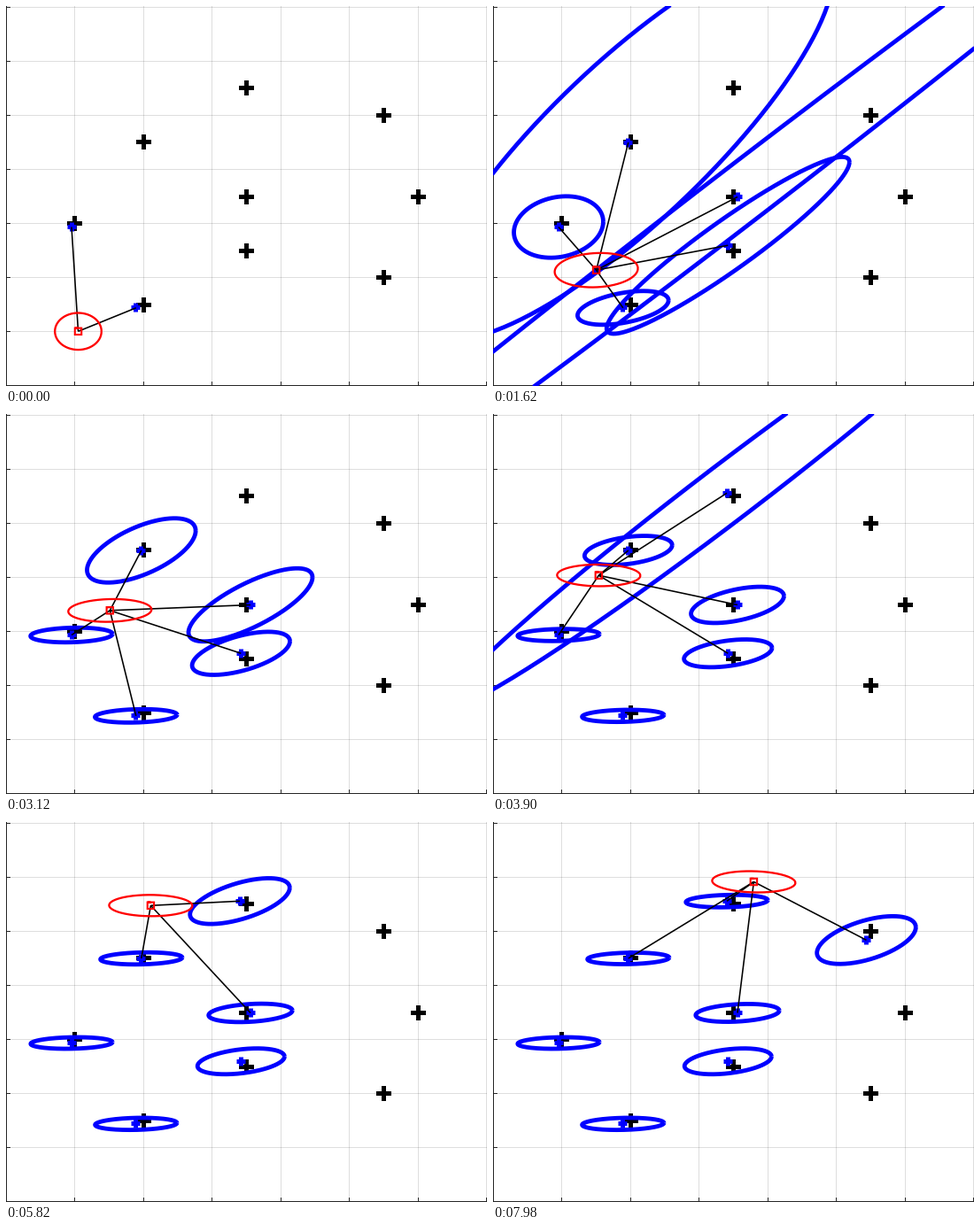
A matplotlib script that plays this animation: 543 by 429 pixels, repeating every 8 s.

```python
import numpy as np
import matplotlib.pyplot as plt
from matplotlib.animation import FuncAnimation

W, H, DPI = 543, 429, 100
UX, UY = 542 / 7, 61.13       # pixels per map unit
SIGHT = 2.5                   # sensor range in map units
SPEED = 0.05                  # map units per step
TICK, STEP, LOOP = 20, 60, 8000   # ms
STEPS = LOOP // STEP + 1
BLUE, RED, AXIS = "#0000ff", "#ff0000", "#262626"

fig = plt.figure(figsize=(W / DPI, H / DPI), dpi=DPI, facecolor="white")
ax = fig.add_axes([0, 0, 1, 1])
ax.set_xlim(0, W)
ax.set_ylim(H, 0)
ax.axis("off")


def stroke(x, y, color, px, z, alpha=1):
    line, = ax.plot(x, y, color=color, lw=px * 72 / DPI, zorder=z, alpha=alpha,
                    solid_capstyle="butt", solid_joinstyle="miter", snap=False)
    return line


def cross(x, y, arm, color, z):
    x, y, gap = int(x) + 0.5, int(y) + 0.5, np.nan
    return stroke([x - arm, x + arm, gap, x, x],
                  [y, y, gap, y - arm, y + arm], color, 5, z)


def to_px(ux, uy):
    return int(0.5 + UX * ux) + 0.5, int(428.98 - UY * uy) + 0.5


# Grid and axes
for k in range(8):
    gx, gy = to_px(k, k)
    stroke([gx, gx], [0, H], AXIS, 1, 0, 0.15)
    stroke([0, W], [gy, gy], AXIS, 1, 0, 0.15)
    stroke([gx, gx], [H - 5, H], AXIS, 1, 1)
    stroke([0, 5], [gy, gy], AXIS, 1, 1)
stroke([0.5, 0.5], [0, H], AXIS, 1, 1)
stroke([0, W], [428.5, 428.5], AXIS, 1, 1)

for spot in [(1, 3), (2, 1.5), (3.5, 5.5), (3.5, 3.5), (3.5, 2.5),
             (5.5, 5), (5.5, 2), (6, 3.5), (2, 4.5)]:
    cross(*to_px(*spot), 8.5, "black", 2)

# Robot path: step, x, y, heading in degrees
WAY = np.array([(0, 81.5, 367.3, 5), (11, 112.3, 347.4, 74), (27, 116.6, 298.2, 89),
                (76, 123.7, 148.8, 82), (97, 163.4, 94.3, 39), (133, 294.4, 67.5, -8)])


def robot(step):
    """Cubic curve through the key points, driven at constant speed."""
    i = min(np.searchsorted(WAY[:, 0], step, side="right") - 1, len(WAY) - 2)
    a, b = WAY[i], WAY[i + 1]
    span = b[0] - a[0]
    t = (step - a[0]) / span

    def slope(key):
        h = np.radians(key[3])
        return SPEED * span * np.array([UX * np.cos(h), -UY * np.sin(h)])

    return ((2 * t**3 - 3 * t**2 + 1) * a[1:3] + (t**3 - 2 * t**2 + t) * slope(a)
            + (3 * t**2 - 2 * t**3) * b[1:3] + (t**3 - t**2) * slope(b))


PATH = np.array([robot(s) for s in range(STEPS)])
ANGLE = np.linspace(0, 2 * np.pi, 241)
CIRCLE = np.array([np.cos(ANGLE), np.sin(ANGLE)])
DIAGONAL = np.array([1, -0.77])


def ellipse(center, cov):
    return np.linalg.cholesky(cov) @ CIRCLE + np.reshape(center, (2, 1))


def fade(n, tau):
    return np.exp(-n / tau)


class Feature:
    """A mapped point whose uncertainty shrinks with every sighting.

    depth and boost stretch it along the diagonal (slow and fast decay),
    ray along the first line of sight; rest is the stretch that remains.
    """

    def __init__(self, x, y, depth, boost=0, ray=0, rest=7.5):
        self.pos = np.array([x, y])
        self.depth, self.boost, self.ray, self.rest = depth, boost, ray, rest
        gap = self.pos - PATH
        self.seen = np.hypot(*(gap / (UX, UY)).T) < SIGHT
        self.count = np.maximum(np.cumsum(self.seen) - 1, 0)
        self.first = np.argmax(self.seen)
        self.aim = gap[self.first] / np.hypot(*gap[self.first])
        self.mark = cross(x, y, 5, BLUE, 3)
        self.ring = stroke([], [], BLUE, 4.8, 4)
        self.beam = stroke([], [], "black", 1.6, 5)

    def cov(self, step):
        n = self.count[step]
        along = self.depth * fade(n, 16) + self.boost * fade(n, 3)
        sight = self.ray * fade(n, 12)
        return (np.diag([45.5, 3 + 20 * fade(n, 12)]) ** 2
                + (along**2 + self.rest**2) * np.outer(DIAGONAL, DIAGONAL)
                + sight**2 * np.outer(self.aim, self.aim))

    def update(self, step):
        known = bool(step >= self.first)
        self.mark.set_visible(known)
        self.ring.set_visible(known and step > 0)
        self.ring.set_data(*ellipse(self.pos, self.cov(step)))
        self.beam.set_visible(bool(self.seen[step]))
        self.beam.set_data(*np.array([PATH[step], self.pos]).T)


features = [
    Feature(74, 249.5, depth=110, ray=285),
    Feature(146.8, 340.8, depth=122, boost=500),
    Feature(265.3, 270.2, depth=420, boost=110, rest=16),
    Feature(152.8, 154, depth=204, boost=45, ray=155),
    Feature(276, 215.5, depth=262, boost=525, rest=12.5),
    Feature(264, 89.3, depth=270, boost=150),
    Feature(421.5, 133.3, depth=65, boost=40),
]


def pose_cov(step):
    sx = 47 - 20.7 * fade(step, 4)
    sy = 12 + (8.8 + 5.15 * step) * fade(step, 9)
    tilt = 0.12 * np.sin(step * np.pi / 16) * sx * sy
    return np.array([[sx**2, tilt], [tilt, sy**2]])


halo = stroke([], [], RED, 2.3, 6)
body = stroke([], [], RED, 2.1, 7)
BOX = np.array([(-1, -1), (1, -1), (1, 1), (-1, 1), (-1, -1), (0, -1)]) * 3.7


def draw(i):
    step = i * TICK // STEP
    for f in features:
        f.update(step)
    halo.set_data(*ellipse(PATH[step], pose_cov(step)))
    body.set_data(*(BOX + PATH[step]).T)
    return [halo, body]


def reset():
    return draw(0)


anim = FuncAnimation(fig, draw, frames=LOOP // TICK, interval=TICK,
                     init_func=reset, repeat=True, repeat_delay=0)
plt.show()
```
